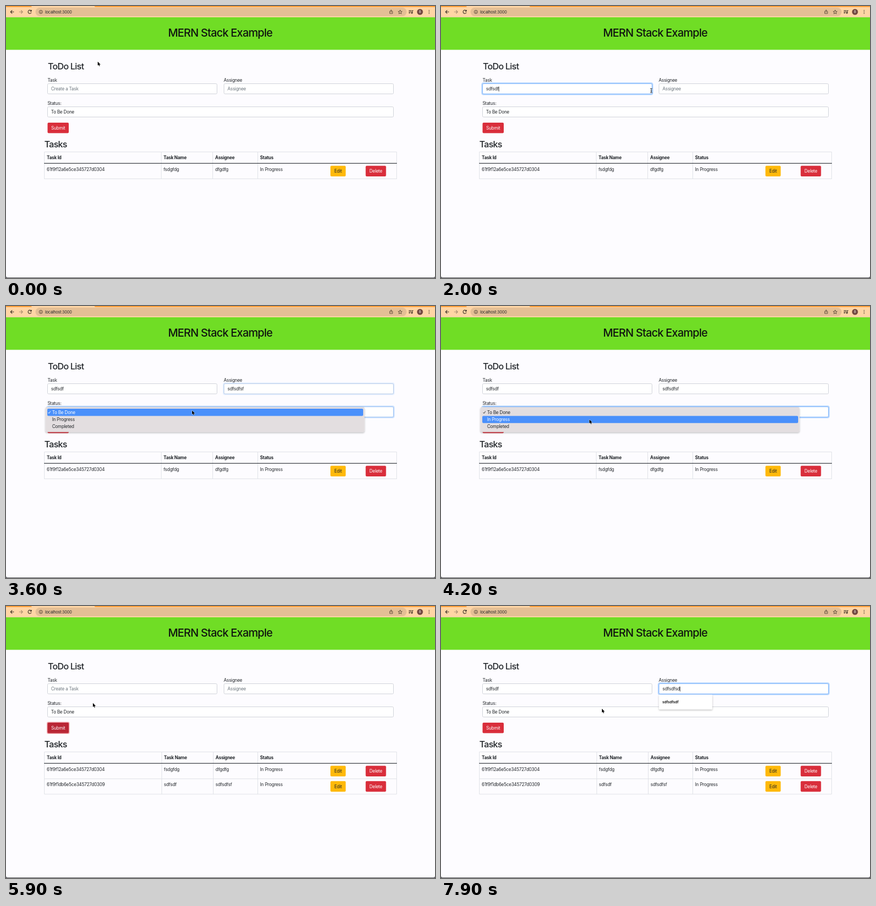
An HTML page that plays this animation: 800 px wide and 506 px high, repeating every 8000 ms.

```html
<!DOCTYPE html>
<html lang="en">
<head>
<meta charset="utf-8">
<title>MERN Stack Example</title>
<style>
  html, body { margin: 0; height: 100%; overflow: hidden; background: #fdfcff; }
  svg { display: block; width: 800px; height: 506px; }
  text { font: 8.3px Inter, Roboto, sans-serif; letter-spacing: -.025em; fill: #212529; white-space: pre; }
  .h1 { font-size: 20.4px; font-weight: 500; letter-spacing: -.038em; fill: #101410; text-anchor: middle; }
  .h2 { font-size: 16.5px; font-weight: 500; letter-spacing: -.045em; }
  .th { font-weight: 700; }
  .hint { fill: #6c757d; }
  .white { fill: #fff; }
  .mid { text-anchor: middle; }
  .saved { font-size: 6.8px; font-weight: 600; fill: #111; }
  .url { font-size: 7.4px; }
  .icon { fill: none; stroke: #3d3226; stroke-width: 1.1; }
</style>
</head>
<body>
<svg viewBox="0 0 800 506">
  <defs>
    <filter id="shadow" x="-10%" y="-20%" width="120%" height="150%">
      <feDropShadow dx="0" dy="1.5" stdDeviation="1.8" flood-opacity=".28"/>
    </filter>
  </defs>
  <rect width="800" height="506" fill="#fdfcff"/>
  <g id="browser">
    <rect width="800" height="21" fill="#ffd5a5"/>
    <path d="M0 0H46Q48 0 48 2H0zM165 0H800V2H167Q165 2 165 0z" fill="#ff9f38"/>
    <rect x="55" y="3" width="692" height="16" rx="8" fill="#e4bf95"/>
    <g class="icon">
      <path d="M15 11H8.5M11.5 8L8.5 11L11.5 14"/>
      <path d="M24.500 11H31M28 8L31 11L28 14" stroke="#a98d6e"/>
      <path d="M47 9A3.200 3.200 0 1 0 47.300 12M47.400 7.300V9.600H45"/>
      <circle cx="65" cy="11" r="3.100" stroke-width=".8"/>
      <path d="M65 10.500V13M65 9V9.800" stroke-width=".9"/>
      <path d="M716.800 9.800H715.600V14H720.800V9.800H719.600M718.200 12V7.400M716.600 8.900L718.200 7.300L719.800 8.900" stroke-width=".8"/>
      <path d="M735 7.500L736 10L738.600 10.200L736.600 11.900L737.300 14.500L735 13.100L732.700 14.500L733.400 11.900L731.400 10.200L734 10z" stroke-width=".8"/>
      <path d="M751 8.500H756.500M751 10.700H756.500M751 12.900H754M757.800 13V8.500H759.500"/>
      <circle cx="756.900" cy="13" r=".9"/>
    </g>
    <circle cx="772" cy="11" r="5.500" fill="#71463f"/>
    <text x="772" y="13" class="mid white" style="font-size:5.5px">B</text>
    <g fill="#3d3226"><circle cx="789" cy="8.300" r=".8"/><circle cx="789" cy="11" r=".8"/><circle cx="789" cy="13.700" r=".8"/></g>
    <text x="73" y="13.600" class="url">localhost:3000</text>
  </g>
  <rect y="21" width="800" height="60.500" fill="#70dd25"/>
  <text x="399.500" y="56.500" class="h1">MERN Stack Example</text>
  <text x="78" y="118" class="h2">ToDo List</text>
  <text x="77.500" y="141.400">Task</text>
  <text x="406" y="141.400">Assignee</text>
  <text x="77.500" y="183.900">Status:</text>
  <text x="71.500" y="262.700" class="h2">Tasks</text>
  <g id="app"></g>
  <path d="M0 502Q0 505 3 505H797Q800 505 800 502V506H0z" fill="#55545a"/>
</svg>
<script>
const LOOP = 8000, STEP = 100;
const OPEN = 3500, PICK = 4500, CLOSE = 4800, SUBMIT = 5500;

const fields = {
  task: { x: 77.5, y: 144.5, w: 316, hint: 'Create a Task' },
  assignee: { x: 406.5, y: 144.5, w: 316, hint: 'Assignee' },
  status: { x: 77.5, y: 187.5, w: 645 }
};
const focusLog = [[1200, 'task'], [2400, 'assignee'], [OPEN, 'status'],
  [5300, 'submit'], [6200, 'task'], [7200, 'assignee']];
const typing = [
  { field: 'task', word: 'sdfsdf', start: 1400, pace: 100, clear: SUBMIT, saved: ['sdfdsfd', 'sdfgfdg'] },
  { field: 'assignee', word: 'sdfsdfsf', start: 2500, pace: 80, clear: SUBMIT, saved: ['sdfsdfsdf'] },
  { field: 'task', word: 'sdfsdf', start: 6500, pace: 100, clear: LOOP, saved: ['sdfdsfd', 'sdfgfdg', 'sdfsdf'] },
  { field: 'assignee', word: 'sdfsdfsd', start: 7200, pace: 100, clear: LOOP, saved: ['sdfsdfsdf'] }
];
const pointerPath = [
  [0, 171, 103.5], [200, 171, 103.5], [1100, 392, 157], [3050, 392, 157], [3450, 347, 194.5],
  [3700, 347, 194.5], [4100, 290, 211], [PICK, 205, 213], [4700, 172, 232], [5100, 107, 228],
  [5700, 107, 228], [5900, 162, 180.5], [6200, 327, 157], [7500, 327, 157], [7900, 300, 191], [LOOP, 299, 194]
];

const clamp = v => Math.max(0, Math.min(1, v));
const text = (x, y, s, cls = '') => `<text x="${x}" y="${y}" class="${cls}">${s}</text>`;
const box = (x, y, w, h, fill, rx = 0, more = '') =>
  `<rect x="${x}" y="${y}" width="${w}" height="${h}" rx="${rx}" fill="${fill}" ${more}/>`;
const button = (x, y, w, label, fill, cls = 'white') =>
  box(x, y, w, 19.6, fill, 2) + text(x + w / 2, y + 12.8, label, 'mid ' + cls);

function focusAmount(name, t) {
  const i = focusLog.findLastIndex(([start]) => t >= start);
  if (i < 0) return 0;
  const k = clamp((t - focusLog[i][0]) / 150);
  if (focusLog[i][1] === name) return k;
  return i && focusLog[i - 1][1] === name ? 1 - k : 0;
}

function input(name, value, t) {
  const { x, y, w, hint } = fields[name], k = focusAmount(name, t);
  const frame = (stroke, more) => box(x, y, w, 19, 'none', 2, `stroke="${stroke}" ${more}`);
  let out = box(x, y, w, 19, '#fff', 2) + frame('#d0d3d9', '');
  if (k) out += box(x - 1.2, y - 1.2, w + 2.4, 21.4, 'none', 3, `stroke="#b5d6ff" stroke-width="2" opacity="${k}"`) +
    frame('#80b5fb', `opacity="${k}"`);
  return out + text(x + 6.5, y + 12.9, value || hint, value ? '' : 'hint');
}

function typedInto(name, t) {
  const run = typing.findLast(r => r.field === name && t >= r.start);
  if (!run || t >= run.clear) return { value: '', saved: [] };
  const value = run.word.slice(0, Math.floor((t - run.start) / run.pace) + 1);
  return { value, saved: run.saved.filter(s => s.startsWith(value) && s !== value) };
}

function suggestions({ x }, saved) {
  return box(x, 165, 99.5, saved.length * 18.7 + 8.6, '#fff', 1, 'filter="url(#shadow)"') +
    saved.map((s, i) => text(x + 6.3, 181.3 + i * 18.6, s, 'saved')).join('');
}

function menu(t, y) {
  if (t < OPEN || t >= CLOSE) return '';
  const active = t >= PICK ? 1 : y < 205 ? 0 : 1;
  const alpha = t <= 4600 ? 1 : .22;
  const items = ['To Be Done', 'In Progress', 'Completed'].map((s, i) =>
    (i === active ? box(77, 191 + i * 13.4, 589, 13.4, '#4a90fb', 2) : '') +
    text(86, 200.6 + i * 13.4, s, i === active ? 'white' : '')).join('');
  return `<g opacity="${alpha}">${box(73.5, 188, 595, 46.5, '#e3dee0', 3, 'filter="url(#shadow)"')}${items}
    <path d="M78.700 198l1.500 1.800 2.700-4" fill="none" stroke="${active ? '#333' : '#fff'}"/></g>`;
}

function table(t) {
  const rows = [['61f9f12a6e5ce345727d0304', 'fsdgfdg', 'dfgdfg']];
  if (t >= SUBMIT) rows.push(['61f9f1db6e5ce345727d0309', 'sdfsdf', 'sdfsdfsf']);
  const shift = rows.length > 1 ? 1 : 0, bottom = 293 + 28.5 * rows.length;
  const columns = [76, 293.7 + shift * .8, 390 + shift * .8, 473.8];
  const line = (cells, y, cls) => cells.map((s, i) => text(columns[i], y, s, cls)).join('');
  let out = `<path d="M71.500 271.500H728.500V${bottom}H71.500zM${289.5 + shift} 271V${bottom}M${385.5 + shift} 271V${bottom}M469.500 271V${bottom}M71 321.500H729"
    fill="none" stroke="#e0e2e7"/>` + box(71, 292, 658, 1.2, '#34383d') +
    line(['Task Id', 'Task Name', 'Assignee', 'Status'], 285, 'th');
  rows.forEach((cells, i) => {
    const y = 297.3 + i * 28.5;
    out += line([...cells, 'In Progress'], y + 9.4) +
      button(605, y, 28.5, 'Edit', '#ffb90a', '') + button(670.7, y, 38, 'Delete', '#d92e3b');
  });
  return out;
}

function pointerAt(t) {
  const i = pointerPath.findIndex(p => p[0] > t);
  const [t0, x0, y0] = pointerPath[i - 1], [t1, x1, y1] = pointerPath[i];
  const u = (t - t0) / (t1 - t0), k = u * u * (3 - 2 * u);
  return [x0 + (x1 - x0) * k, y0 + (y1 - y0) * k];
}

function pointer(x, y) {
  const overText = y > 144 && y < 164 && (x > 77 && x < 394 || x > 406 && x < 723);
  const shape = overText
    ? '<path d="M-2-3.700Q0-3.700 0-2.500Q0-3.700 2-3.700M0-2.500V3.300M-2 4.300Q0 4.300 0 3.100Q0 4.300 2 4.300M-1 1H1" fill="none" stroke="#222" stroke-width=".9"/>'
    : '<path d="M0 0V7.300L1.700 5.800L2.900 8.500L4.100 8L3 5.400H5.300z" stroke="#fff" stroke-width=".8" paint-order="stroke"/>';
  return `<g transform="translate(${x} ${y})">${shape}</g>`;
}

const app = document.getElementById('app');

function draw(t) {
  const [x, y] = pointerAt(t);
  const pressed = focusAmount('submit', t);
  const over = x > 77 && x < 117 && y > 217 && y < 237;
  let popups = '', out = '';
  for (const name of ['task', 'assignee']) {
    const { value, saved } = typedInto(name, t);
    out += input(name, value, t);
    if (focusAmount(name, t) > .5) {
      if (saved.length) popups += suggestions(fields[name], saved);
      if (value) popups += `<path data-caret="${name}" stroke="#111" stroke-width=".8"/>`;
    }
  }
  out += input('status', t >= CLOSE && t < SUBMIT ? 'In Progress' : 'To Be Done', t);
  if (pressed) out += box(76, 215.5, 42.5, 22.6, '#f0a3aa', 3, `opacity="${pressed}"`);
  out += button(77.5, 217, 39.5, 'Submit', over || pressed > .5 ? '#b92635' : '#d92e3b');
  app.innerHTML = out + table(t) + popups + menu(t, y) + pointer(x, y);

  const caret = app.querySelector('[data-caret]');
  if (caret) {
    const { x: left } = fields[caret.dataset.caret];
    const { value } = typedInto(caret.dataset.caret, t);
    const label = [...app.querySelectorAll('text')].find(e => e.textContent === value && +e.getAttribute('x') === left + 6.5);
    caret.setAttribute('d', `M${left + 6.8 + label.getComputedTextLength()} 150V159`);
  }
}

function tick() {
  draw(Math.floor(performance.now() % LOOP / STEP) * STEP);
  requestAnimationFrame(tick);
}
tick();
</script>
</body>
</html>
```
